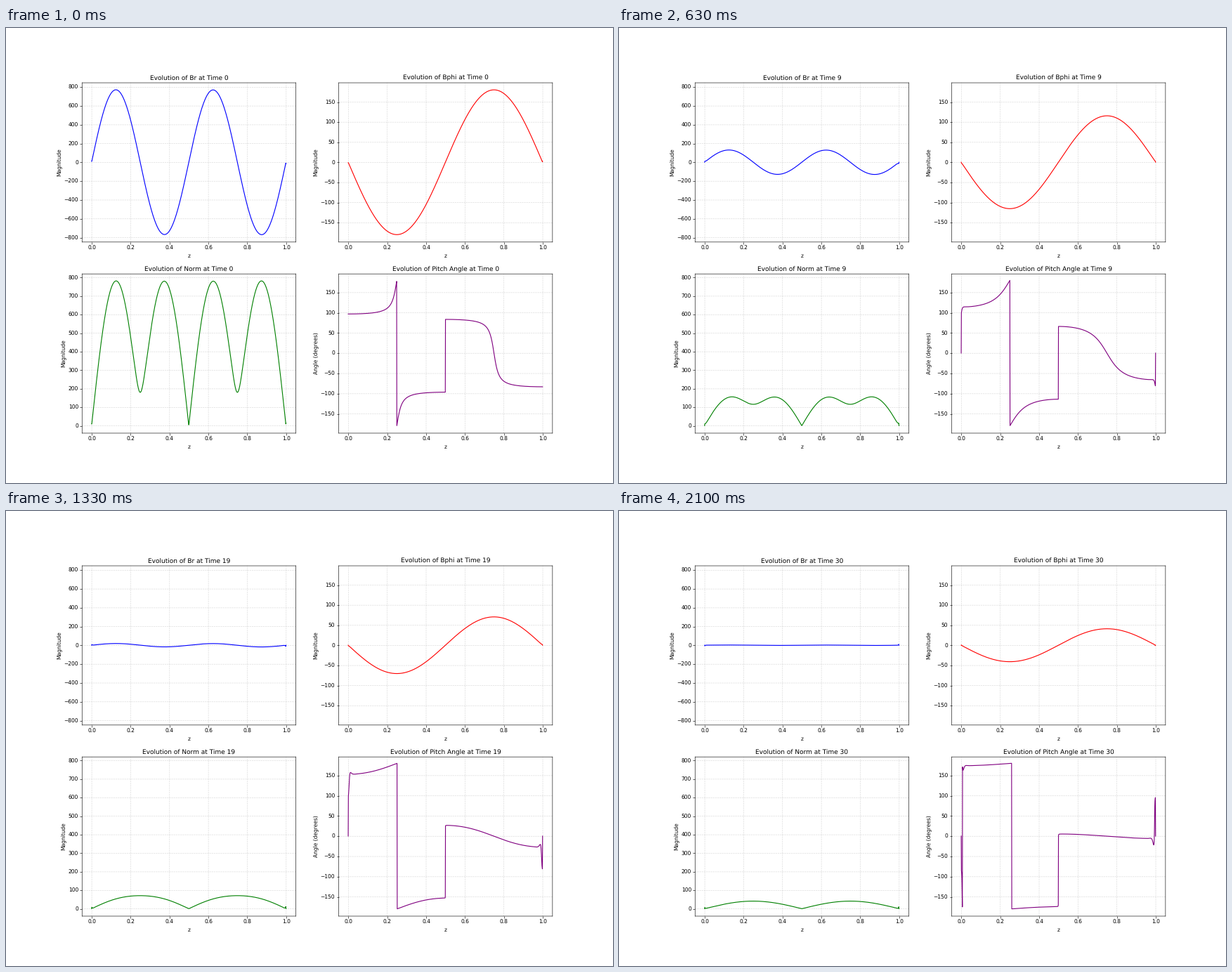
Write a matplotlib script that moves like this. It is 864 px wide and 648 px high and loops after 2170 ms.

```python
import numpy as np
import matplotlib.pyplot as plt
from matplotlib.animation import FuncAnimation
from matplotlib.transforms import ScaledTranslation

STEPS, INTERVAL = 31, 70
N = 1000
ETA = 0.00125  # diffusivity per time step
HALF = 0.005  # inches, centres the frame and grid lines on the pixels

plt.rcParams.update({"path.snap": False, "text.hinting": "none"})
z = np.linspace(0, 1, N)


def crank_nicolson():
    """One-step matrix for diffusion with both ends held at zero."""
    r = ETA / (z[1] - z[0]) ** 2
    eye = np.eye(N)
    lap = np.eye(N, k=1) + np.eye(N, k=-1) - 2 * eye
    left, right = eye - r / 2 * lap, eye + r / 2 * lap
    left[[0, -1]] = eye[[0, -1]]
    right[[0, -1]] = 0
    return np.linalg.solve(left, right)


def evolve():
    """Radial and azimuthal field for every time step."""
    br = 770 * np.sin(4 * np.pi * z) + np.sin(2 * np.pi * z)
    bphi = -180 * np.sin(2 * np.pi * z)
    field = np.stack([br, bphi], axis=1)
    # Ends that start off zero set up the ringing near the walls.
    field[0], field[-1] = field[1], 1.5 * field[-2]
    step = crank_nicolson()
    out = [field]
    for _ in range(STEPS - 1):
        field = step @ field
        field[[0, -1]] = 0.0
        out.append(field)
    return np.array(out)


history = evolve()
br, bphi = history[..., 0], history[..., 1]
panels = [
    ("Br", "Magnitude", "blue", (-847, 847), br),
    ("Bphi", "Magnitude", "red", (-198, 198), bphi),
    ("Norm", "Magnitude", "green", (-39.05, 820.1), np.hypot(br, bphi)),
    ("Pitch Angle", "Angle (degrees)", "purple", (-197.5, 196.3),
     np.degrees(np.arctan2(br, bphi))),
]

fig, axes = plt.subplots(2, 2, figsize=(16, 12), dpi=54)
dx, dy = HALF / 16, HALF / 12
fig.subplots_adjust(left=0.125 + dx, right=0.9 + dx,
                    bottom=0.11 - dy, top=0.88 - dy)
back = ScaledTranslation(-HALF, HALF, fig.dpi_scale_trans)

lines = []
for ax, (name, ylabel, color, ylim, data) in zip(axes.flat, panels):
    line, = ax.plot(z, data[0], color=color)
    line.set_transform(ax.transData + back)
    lines.append(line)
    ax.set(xlim=(-0.05, 1.05), ylim=ylim, xlabel="z", ylabel=ylabel)
    ax.grid(True, linestyle="--", alpha=0.5)


def update(t):
    for ax, line, (name, _, _, _, data) in zip(axes.flat, lines, panels):
        line.set_ydata(data[t])
        ax.set_title(f"Evolution of {name} at Time {t}")
    return lines


anim = FuncAnimation(fig, update, frames=STEPS, interval=INTERVAL,
                     repeat=True, repeat_delay=0, blit=False)
plt.show()
```
